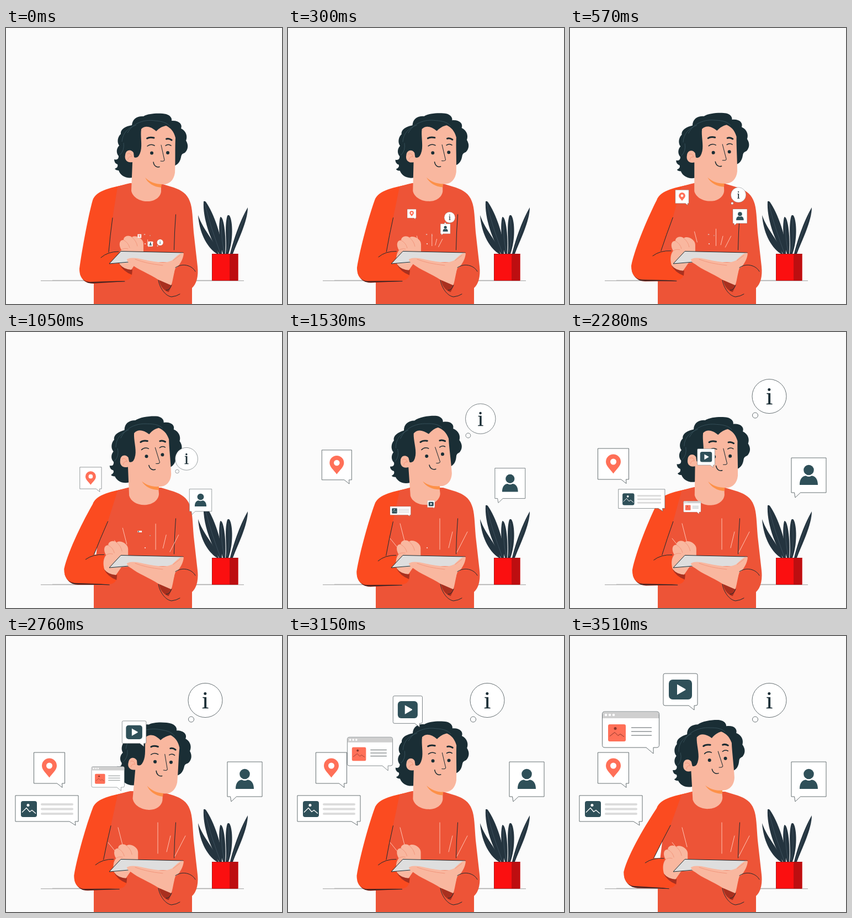
Animation of 500x500 px, one loop 3540 ms. Source, as an HTML page:

```html
<!DOCTYPE html>
<html lang="en">
<head>
<meta charset="utf-8">
<title>Sharing from a tablet</title>
<style>
html, body { margin: 0; width: 100%; height: 100%; overflow: hidden; background: #fbfbfb; }
svg { display: block; width: 100vw; height: 100vh; }
.ink { fill: none; stroke: #1b2b31; stroke-width: 1; stroke-linecap: round; stroke-linejoin: round; }
.brow { stroke-width: 3; }
.lid { stroke-width: 1.5; }
.hair { fill: #1a2e35; }
.skin { fill: #f9b79f; }
.fold { fill: none; stroke: #ef8f74; stroke-width: .8; stroke-linecap: round; }
.torso { fill: #ed5437; }
.sleeve { fill: #fb4b20; }
.inner { fill: #a8301f; }
.leaf { fill: #24343f; }
.vein { fill: none; stroke: #475a66; stroke-width: .7; }
.spark { fill: none; stroke: #ffc3b3; stroke-linecap: round; }
.paper { fill: #fff; stroke: #566064; stroke-width: .9; stroke-linejoin: round; }
.teal { fill: #2f5059; }
.coral { fill: #ff7058; }
.white { fill: #fff; }
.photo { fill: none; stroke: #fff; stroke-width: 1.3; stroke-linejoin: round; }
</style>
</head>
<body>
<svg viewBox="0 0 500 500">
  <path d="M63 457.8H431" stroke="#bdbdbd" stroke-width="1.6"/>
  <path d="M84 457.2H374" stroke="#a4a4a4" stroke-width=".8"/>

  <g id="plant">
    <path class="leaf" d="M348 339C350 368 362 396 382 409H385C379 386 358 368 348 339Z"/>
    <path class="leaf" d="M358 314C356 345 371 385 386 409H391C393 380 376 335 362 315Q360 313 358 314Z"/>
    <path class="leaf" d="M388 343C384 360 387 390 393 409H397C399 385 396 352 391 344Q389 341 388 343Z"/>
    <path class="leaf" d="M401 340C395 360 401 390 398 409H403C412 385 411 350 405 340Q403 338 401 340Z"/>
    <path class="leaf" d="M438 325C426 345 413 380 406 409H411C420 385 438 350 438 325Z"/>
    <path class="vein" d="M361 320C368 352 380 385 388 407M390 350Q390 380 395 406M403 346Q406 380 401 406M435 335Q420 370 409 406"/>
    <path d="M373 409H420.500V457.500H373Z" fill="#fb0f10"/>
    <path d="M405 409H420.500V457.500H405Z" fill="#bd0e10"/>
    <path d="M373 409.500H420.500M373.500 409V457.500H420" fill="none" stroke="#a51518" stroke-width=".8"/>
  </g>

  <path class="torso" d="M225 281C205 286 188 290 176 297L159 440V500H337V471C345 464 349 450 347 432L340 370C338 345 338 326 333 314C328 300 318 294 304 289L281 282Z"/>
  <path class="ink" d="M307.500 338Q305 370 304.500 402"/>

  <g id="head">
    <path class="hair" d="M196 238Q204 240 204 232C199 226 200 218 205 213C200 206 203 196 208 192C207 183 217 178 228 176C229 164 238 159 249 160C259 154 280 154 290 156C297 158 301 163 300 168C314 167 320 175 317 182C327 187 329 197 326 204C331 212 330 220 324 226C319 228 318 229 317 234C315 244 310 248 304 250L250 262L229 271C217 273 207 267 204 258Q199 258 197 255Q204 252 202 247Q196 245 196 238Z"/>
    <path d="M210 206C211 190 222 180 236 176M220 190C230 172 250 165 270 168C284 169 292 172 297 178M206 230Q215 222 213 208" fill="none" stroke="#3b5660" stroke-width=".8"/>
    <path class="skin" d="M245 183C252 176 262 178 272 187C278 181 284 178 290 177C298 181 304 187 307 199C306 215 307 240 306 262C304 277 294 285 281 283V296C280 307 268 315 255 314C242 314 229 306 227 295L229 243C219 245 214 238 216 230C217 220 227 219 231 226L232 234Q240 238 244 223C247 212 243 195 245 183Z"/>
    <path class="fold" d="M220 228Q226 225 228 233M221 238Q222 232 227 233"/>
    <path d="M252 271C260 279 271 283 282 283L281 289C268 288 257 281 252 271Z" fill="#fd9148"/>
    <path class="ink brow" d="M255.500 200Q260 197 268 199M290.500 201Q295 199.500 300 203"/>
    <path class="ink lid" d="M256 214Q262 209 269 213M289 213Q294 209.500 299 213"/>
    <circle class="hair" cx="264" cy="226.500" r="3"/>
    <circle class="hair" cx="293" cy="226" r="3"/>
    <path class="ink" d="M281 212L287 239Q287 242 280 241"/>
    <path class="ink lid" d="M267 243C268 250 273 253 278 251.500"/>
  </g>

  <g id="sparks">
    <path class="spark" vector-effect="non-scaling-stroke" d="M203 347L212 382M185 374L198 390M275 338V394M298 362L291 391M325 362L306 399"/>
  </g>

  <path class="limb" fill="#7d2216" d="M134 445C138 458 146 463 158 463L216 459L150 455Z"/>
  <path class="limb sleeve" d="M224 282C192 289 164 293 157 312C149 340 138 400 133 436C133 452 140 459 152 460L212 458C222 457 229 455 229 438Q216 434 206 428Q202 416 205 405L186 406L193 344L202 288Z"/>
  <path class="limb ink" d="M193 344L189 376L186 406M172 416Q184 405 204 405M148 461L215 459"/>
  <g id="hand">
    <path class="inner" d="M205 427Q216 430 229 438L228 447Q212 441 205 427Z"/>
    <path class="skin" d="M206 428C203 418 204 408 209 402C203 392 206 383 213 384C213 377 222 374 228 379C234 374 249 381 249 391V406L227 438Q213 437 206 428Z"/>
    <path class="fold" d="M213 384Q222 389 224 398M228 379Q236 385 238 395M209 402Q214 398 221 400"/>
  </g>

  <path d="M187 427L208 404.500L321 407L302 424L240 424Z" fill="#dedede"/>
  <path class="ink" d="M222 424L187 427L208 404.500L321 407"/>
  <path class="inner" d="M277 457C280 470 288 477 296 479Q302 470 302 460Z"/>
  <path class="skin" d="M219 419C229 413 245 419 262 422C279 425 291 426 301 421C308 414 317 405 322 408C321 420 314 430 306 438C304 450 304 460 299 466L276 456C259 445 238 437 227 428Q219 424 219 419Z"/>
  <path class="fold" d="M234 419Q254 427 284 430M303 421L315 412"/>
  <path class="torso" d="M307 435C322 425 337 430 343 441L335 474C322 482 310 487 300 487Q296 486 293 481C302 468 302 450 307 435Z"/>
  <path class="ink" d="M307 434C320 425 337 430 343 441M276 457C279 473 290 486 300 487Q309 486 315 482M300 466Q296 476 290 475"/>

  <g id="list">
    <path class="paper" d="M-57-23.500H57V23.500H51L52 30.500L41 23.500H-57Z"/>
    <rect class="teal" x="-47" y="-13.500" width="29" height="29" rx="4"/>
    <path class="photo" d="M-45 7L-37-1L-31 6L-27 3L-20 9"/>
    <circle class="white" cx="-34" cy="-6" r="2.500"/>
    <path d="M-9-7.500H46M-9 1H46M-9 9.500H46" stroke="#dcdcdc" stroke-width="4" stroke-linecap="round"/>
  </g>
  <g id="pin">
    <path class="paper" d="M-28-28H28V28H23L23.500 35.500L14 28H-28Z"/>
    <path class="coral" d="M0 17.500C-6 9-13.500 4-13.500-4A13.500 13.500 0 0 1 13.500-4C13.500 4 6 9 0 17.500Z"/>
    <circle class="white" cy="-4" r="5.500"/>
  </g>
  <g id="user">
    <path class="paper" d="M-31.500-31.500H31.500V31.500H-15L-24.500 40.500L-26 31.500H-31.500Z"/>
    <circle class="teal" cy="-9.500" r="9.300"/>
    <path class="teal" d="M-16.500 17.500C-16.500 6-11 1-5 1Q0 4 5 1C11 1 16.500 6 16.500 17.500Z"/>
  </g>
  <g id="info">
    <circle class="paper" r="31"/>
    <circle class="paper" cx="-25.500" cy="34.500" r="5"/>
    <text y="14.500" text-anchor="middle" font-family="'Liberation Serif', serif" font-size="44" fill="#1b2e36" stroke="#1b2e36" stroke-width=".4">i</text>
  </g>
  <g id="panel">
    <path class="paper" d="M-47-32.500H47Q51.500-32.500 51.500-28V28Q51.500 32.500 47 32.500H41V43.500L28 32.500H-47Q-51.500 32.500-51.500 28V-28Q-51.500-32.500-47-32.500Z"/>
    <path d="M-51-20.500V-28Q-51-32-47-32H47Q51-32 51-28V-20.500Z" fill="#cfcfcf"/>
    <path class="photo" style="stroke-width:4.600;stroke-linecap:round" d="M-45-26.500h0M-38-26.500h0M-31-26.500h0"/>
    <rect class="coral" x="-41" y="-9.500" width="32" height="31" rx="3"/>
    <path d="M-38 12L-29 5L-23 11L-19 8L-12 13" fill="none" stroke="#8c352b"/>
    <circle cx="-28" cy="-2" r="2.500" fill="#8c352b"/>
    <path d="M1-3.500H38M1 3.500H38M1 10.500H38" stroke="#555d60" stroke-width="1.200"/>
  </g>
  <g id="video">
    <path class="paper" d="M-28-29H28Q31-29 31-26V26Q31 29 28 29H25V37L15 29H-28Q-31 29-31 26V-26Q-31-29-28-29Z"/>
    <rect class="teal" x="-21" y="-18" width="42" height="36" rx="7"/>
    <path class="white" d="M-6-9Q-6-10-5-9L9-1Q10 0 9 1L-5 9Q-6 10-6 9Z"/>
  </g>
</svg>

<script>
const LOOP = 3540;
const $ = id => document.getElementById(id);
const place = (id, value) => $(id).setAttribute("transform", value);
const clamp = v => Math.min(1, Math.max(0, v));

// Each card grows steadily while it flies along a curve out of the tablet.
const cards = {
  info: { start: -400, end: 1800, path: [[261, 449], [311, 283], [361, 116.5]] },
  user: { start: -290, end: 1800, path: [[241, 420], [312, 313], [432.5, 259.5]] },
  pin: { start: -220, end: 1595, path: [[251, 411], [220, 263], [78.5, 239]] },
  list: { start: 930, end: 2760, path: [[251, 374], [187, 275], [74, 312.5]] },
  video: { start: 990, end: 3510, path: [[261, 376], [264, 223], [200, 97]] },
  panel: { start: 1740, end: 3510, path: [[252, 391], [211, 264], [110, 169.5]] }
};

// Turning points [time, value]; the motion eases between them.
const lean = [[-200, .2], [1700, -6.3], [2820, 3], [LOOP, -5.5]];
const reach = [[0, 0], [870, 30], [1880, 1], [2450, 25], [2980, 1], [LOOP, 36]];

function sway(turns, t) {
  const i = turns.findIndex(([end]) => end > t);
  const [t0, a] = turns[i - 1], [t1, b] = turns[i];
  return a + (b - a) * (1 - Math.cos(Math.PI * (t - t0) / (t1 - t0))) / 2;
}

const limbs = [...document.querySelectorAll(".limb")].map(el => [el, el.getAttribute("d")]);

// The shoulder stays put, the forearm slides out and its elbow lifts.
const bend = (d, push) => d.replace(/([\d.]+) ([\d.]+)/g, (_, x, y) => {
  const shift = push * clamp((y - 315) / 95);
  return `${x - shift} ${y - shift * (229 - x) * .0025}`;
});

function fly(id, t) {
  const { start, end, path: [from, via, to] } = cards[id];
  const u = clamp((t - start) / (end - start)), v = 1 - u;
  const [x, y] = from.map((p, i) => v * v * p + 2 * u * v * via[i] + u * u * to[i]);
  place(id, `translate(${x} ${y}) scale(${Math.max(u, .02)})`);
}

function draw(t) {
  const push = sway(reach, t);
  place("head", `rotate(${sway(lean, t)} 243 344)`);
  for (const [el, d] of limbs) el.setAttribute("d", bend(d, push));
  place("hand", `translate(${-push} ${push * .08})`);
  place("sparks", `translate(252 395) scale(${Math.min(1, .2 + t * .0006)}) translate(-252 -395)`);
  for (const id in cards) fly(id, t);
}

const start = performance.now();
function tick() {
  draw((performance.now() - start) % LOOP);
  requestAnimationFrame(tick);
}
tick();
</script>
</body>
</html>
```
